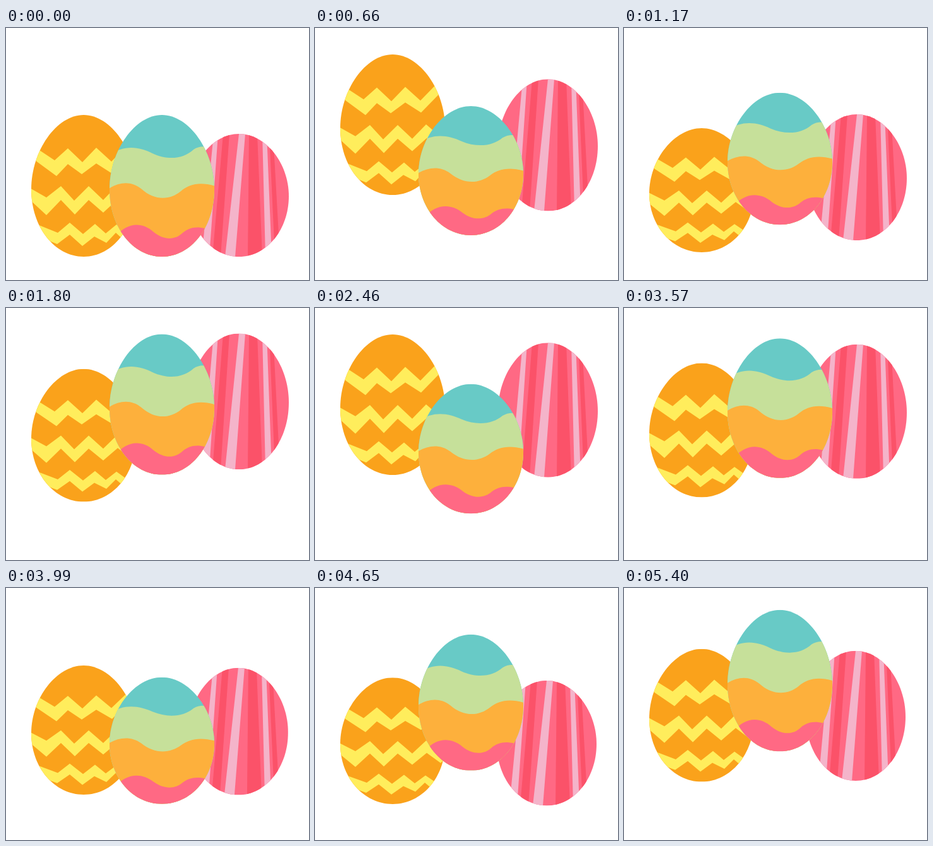
These frames come from a looping animation (480x400 px, 5.43 s). An HTML page:

```html
<!DOCTYPE html>
<html lang="en">
<head>
<meta charset="utf-8">
<title>Bouncing eggs</title>
<style>
  html, body { margin: 0; width: 100%; height: 100%; overflow: hidden; background: #fff; }
  svg { display: block; width: 100vw; height: 100vh; }
</style>
</head>
<body>
<svg viewBox="0 0 480 400">
  <defs>
    <clipPath id="shape-left"><path d="M123 138C166 138 206 195 206 256C206 316 169 363 123 363C77 363 40 316 40 256C40 195 80 138 123 138Z"/></clipPath>
    <clipPath id="shape-mid"><path d="M247 138C290 138 330 195 330 256C330 316 293 363 247 363C201 363 164 316 164 256C164 195 204 138 247 138Z"/></clipPath>
    <clipPath id="shape-right"><path d="M369 168C411 168 448 214 448 267C448 320 413 363 369 363C325 363 290 320 290 267C290 214 327 168 369 168Z"/></clipPath>
  </defs>

  <g id="right"><g clip-path="url(#shape-right)">
    <path fill="#ff6984" d="M280 160H460V370H280Z"/>
    <path fill="#f4b4ca" d="M329 168H336L322 363H310ZM369 168H379L363 363H347ZM406 168H413L421 363H411Z"/>
    <path fill="#fb5269" d="M344 168H354L340 363H327ZM385 168H398L406 363H383ZM417 168H423L434 363H426Z"/>
  </g></g>

  <g id="left"><g clip-path="url(#shape-left)">
    <path fill="#faa21b" d="M30 130H216V370H30Z"/>
    <g fill="#ffed5c">
      <path d="M53 194L77 210L98 191L121 213L143 190L167 212L190 188L197 201L168 231L143 215L120 232L98 216L80 235L46 210L40 200Z"/>
      <path d="M36 253L64 269L87 251L108 274L131 251L154 273L176 250L199 270L210 260V279L199 290L177 272L154 293L131 273L109 296L87 273L64 297L36 271Z"/>
      <path d="M50 312L82 325L101 309L122 327L141 311L158 326L175 312L192 325L188 338L174 325L159 341L140 331L121 346L101 328L81 343L54 332Z"/>
    </g>
  </g></g>

  <g id="mid"><g clip-path="url(#shape-mid)">
    <path fill="#68cac6" d="M154 130H340V370H154Z"/>
    <path fill="#c6e09a" d="M160 205C185 184 210 188 232 199C258 211 282 207 297 193C308 186 318 187 340 195V370H154Z"/>
    <path fill="#fdb03c" d="M160 257C178 244 198 242 214 255C236 275 260 273 277 259C292 246 312 243 340 254V370H154Z"/>
    <path fill="#ff6984" d="M174 331C190 310 214 306 234 324C250 337 268 337 280 325C292 315 306 313 330 323V370H154Z"/>
  </g></g>
</svg>
<script>
const LOOP = 5430, STEP = 30, FLOOR = 363;

// low/high: vertical scale on the floor and at the apex
const eggs = [
  { id: 'left',  start: 240, period: 900, up: 450, down: 445, rise: 105, low: 195 / 225, high: 1 },
  { id: 'mid',   start: 530, period: 895, up: 400, down: 465, rise: 105, low: 195 / 225, high: 1 },
  { id: 'right', start: 420, period: 864, up: 440, down: 385, rise: 133, low: 1, high: 221 / 195, drift: -2 }
];
for (const egg of eggs) egg.node = document.getElementById(egg.id);

const clamp = v => Math.max(0, Math.min(1, v));

function lift(egg, t) {
  const s = (t - egg.start) % egg.period;
  return s < egg.up ? s / egg.up : clamp(1 - (s - egg.up) / egg.down);
}

function draw(t) {
  for (const egg of eggs) {
    let y = 0, scale = 1;
    if (t >= Math.max(270, egg.start)) {
      const u = lift(egg, t);
      y = -egg.rise * u;
      scale = egg.low + (egg.high - egg.low) * u;
    }
    const x = (egg.drift || 0) * clamp((t - 3700) / 530);
    egg.node.setAttribute('transform',
      `translate(${x} ${FLOOR + y}) scale(1 ${scale}) translate(0 ${-FLOOR})`);
  }
}

const origin = performance.now();
function tick() {
  const t = (performance.now() - origin) % LOOP;
  draw(Math.floor(t / STEP) * STEP);
  requestAnimationFrame(tick);
}
draw(0);
requestAnimationFrame(tick);
</script>
</body>
</html>
```
